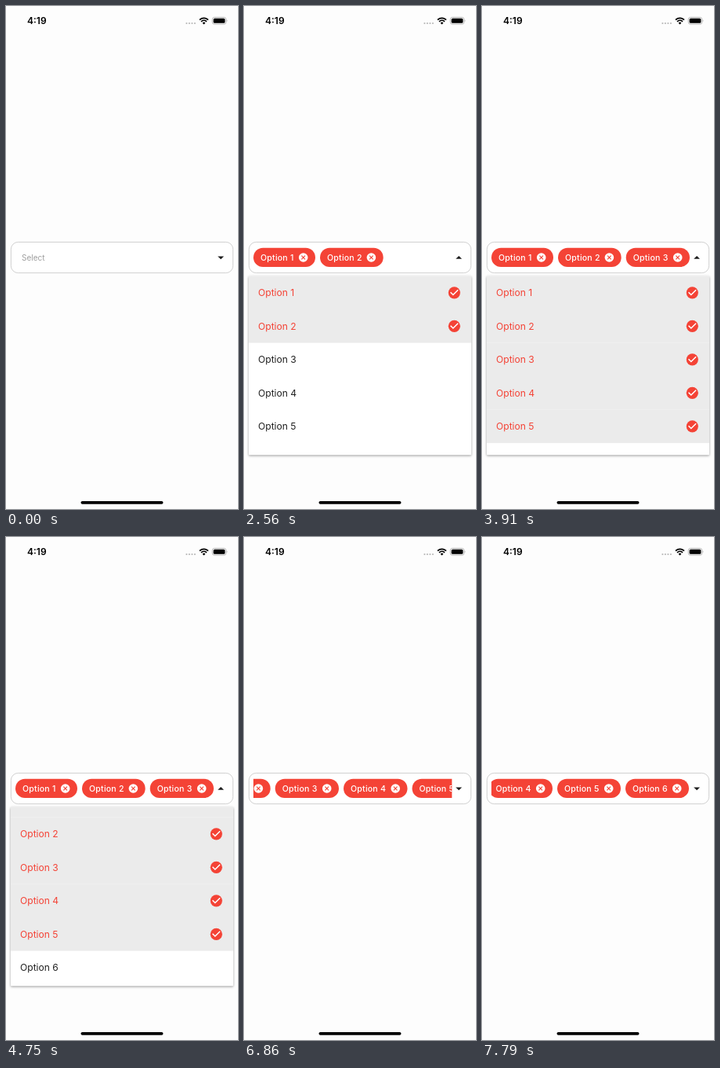
These frames come from a looping animation (296 by 640 pixels, 7990 ms). An HTML page:

```html
<!DOCTYPE html>
<html lang="en">
<head>
<meta charset="utf-8">
<title>Multi-select dropdown</title>
<style>
  html, body { margin: 0; width: 100%; height: 100%; overflow: hidden; background: #fdfdfd; }
  svg { display: block; width: 100%; height: 100%; }
  text { font-family: Inter, "Liberation Sans", sans-serif; }
  .time { font-size: 12px; font-weight: 600; }
  .hint { font-size: 10px; fill: #9e9e9e; }
  .label { font-size: 10.6px; font-weight: 500; letter-spacing: .2px; fill: #fff; }
  .row { font-size: 12.1px; }
  .panel { fill: #fff; filter: drop-shadow(0 1.2px 1.4px rgba(0, 0, 0, .4)); }
</style>
</head>
<body>
<svg viewBox="0 0 296 640">
  <defs>
    <clipPath id="chipClip"><rect x="12" y="302" width="253.3" height="36"/></clipPath>
    <clipPath id="listClip"><rect x="6" y="343.5" width="284" height="227.7"/></clipPath>
  </defs>

  <text class="time" x="27" y="23.2">4:19</text>
  <g fill="#b8b8b8">
    <circle cx="230.4" cy="22" r="1.1"/><circle cx="233.9" cy="22" r="1.1"/>
    <circle cx="237.4" cy="22" r="1.1"/><circle cx="240.9" cy="22" r="1.1"/>
  </g>
  <g fill="none" stroke="#000" stroke-width="1.7">
    <path d="M247 17.6A8 8 0 0 1 258 17.6"/>
    <path d="M249 19.8A5 5 0 0 1 256 19.8"/>
  </g>
  <path d="M250.6 21.4A2.8 2.8 0 0 1 254.4 21.4L252.5 23.4Z"/>
  <rect x="263.2" y="14.4" width="17.6" height="8.8" rx="2.7" fill="none" stroke="#aaa" stroke-width=".8"/>
  <rect x="264.6" y="15.8" width="14.8" height="6" rx="1.6"/>
  <path d="M281.6 17.3Q283.4 18.8 281.6 20.3Z" fill="#aaa"/>
  <rect x="95.5" y="630" width="105" height="3.7" rx="1.85"/>

  <rect x="6.4" y="300.4" width="283.2" height="39.2" rx="9" fill="#fff" stroke="#c4c4c4" stroke-width=".8"/>
  <text id="hint" class="hint" x="20" y="323.5">Select</text>
  <g clip-path="url(#chipClip)"><g id="chips"></g></g>
  <path id="arrow" fill="#1c1c1c"/>
  <g id="menu">
    <rect class="panel" x="6" y="343.5" width="284" height="227.7" rx="1"/>
    <g clip-path="url(#listClip)"><g id="rows"></g></g>
  </g>
</svg>
<script>
const LOOP = 7990, STEP = 103.3, ROW = 42.5, RED = [244, 67, 54], INK = [33, 33, 33];
const OPEN = 1410, CLOSE = 5780;
const picks = [1840, 2340, 2710, 3260, 3690, 5100];
const chipX = [0, 85, 171.7, 259, 346.5, 433.5, 520.5];
const listPath = [[4440, 7], [4540, 18], [4650, 26], [4750, 29.5], [4860, 28.5], [4960, 27]];
const chipPath = [[6650, 25], [6856, 143.7], [6960, 192], [7070, 226], [7180, 248],
                  [7280, 260], [7380, 266], [7490, 267], [7590, 265], [7786, 262.5]];

const $ = id => document.getElementById(id);
const clamp = v => Math.max(0, Math.min(1, v));

function scrollAt(t, path) {
  const start = path[0][0];
  if (t < start) return 0;
  const held = start + Math.floor((t - start) / STEP) * STEP;
  const i = path.findIndex(p => p[0] > held);
  if (i < 0) return path[path.length - 1][1];
  const [t0, a] = path[i - 1], [t1, b] = path[i];
  return a + (b - a) * (held - t0) / (t1 - t0);
}

function chip(i) {
  const x = 12 + chipX[i], w = chipX[i + 1] - chipX[i] - 6;
  return `<rect x="${x}" y="307.7" width="${w}" height="24.4" rx="12.2" fill="#f44336"/>
    <text class="label" x="${x + 9}" y="323.7">Option ${i + 1}</text>
    <g transform="translate(${x + w - 15.3} 320)"><circle r="5.8" fill="#fff"/>
    <path d="M-2.3-2.3L2.3 2.3M2.3-2.3L-2.3 2.3" stroke="#f44336" stroke-width="1.15"/></g>`;
}

function row(i, t) {
  const y = 343.5 + i * ROW, on = t >= picks[i];
  const mix = on ? clamp((t - picks[i] + 70) / 220) : 0;
  const color = INK.map((c, k) => Math.round(c + (RED[k] - c) * mix));
  const text = `<text class="row" x="18" y="${y + 25.8}" fill="rgb(${color})">Option ${i + 1}</text>`;
  if (!on) return text;
  return `<rect x="6" y="${y}" width="284" height="${ROW + .1}" fill="#ebebeb"/>${text}
    <g transform="translate(259.2 ${y + 12.2}) scale(.759)"><circle cx="12" cy="12" r="10" fill="#f44336"/>
    <path d="M5.7 11.3L10 15.6L18.3 7.3" fill="none" stroke="#fff" stroke-width="2"/></g>`;
}

function render(t) {
  const up = t >= OPEN + 110 && t < CLOSE + 120;
  const open = t >= OPEN && t < CLOSE;
  $("hint").style.display = t < picks[0] ? "" : "none";
  $("arrow").setAttribute("d", up ? "M270.2 321.8H278L274.1 318Z" : "M270.2 318.4H278L274.1 322.2Z");

  $("chips").innerHTML = picks.map((p, i) => t >= p ? chip(i) : "").join("");
  $("chips").setAttribute("transform", `translate(${-scrollAt(t, chipPath)} 0)`);

  $("menu").style.display = open ? "" : "none";
  if (open) {
    $("rows").innerHTML = picks.map((p, i) => row(i, t)).join("");
    $("rows").setAttribute("transform", `translate(0 ${-scrollAt(t, listPath)})`);
  }
}

const begin = performance.now();
function frame() {
  render((performance.now() - begin) % LOOP);
  requestAnimationFrame(frame);
}
frame();
</script>
</body>
</html>
```
